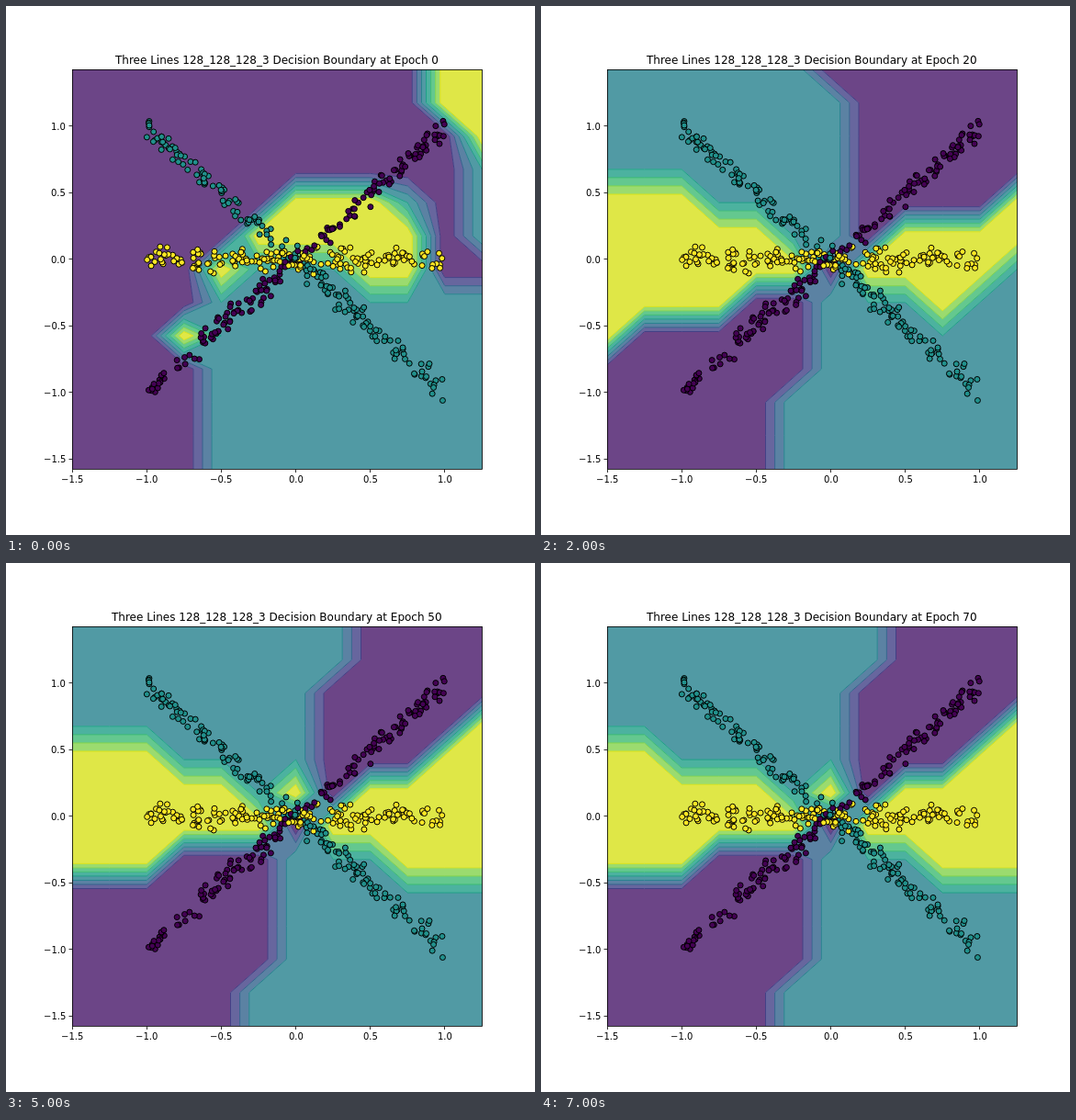
Recreate the animation shown at these times as an HTML page with a canvas. Size 576 by 576 pixels, loop 8000 ms.

```html
<!DOCTYPE html>
<html>
<head>
<meta charset="utf-8">
<style>
html, body { margin: 0; width: 100%; height: 100%; overflow: hidden; background: #fff; }
canvas { display: block; }
</style>
</head>
<body>
<canvas id="stage" width="576" height="576"></canvas>
<script>
const ctx = document.getElementById('stage').getContext('2d');
const LEFT = 72, TOP = 69.12, WIDTH = 446.4, HEIGHT = 434.88;
const COLS = 12, ROWS = 13, STEP_MS = 1000, DOTS_PER_LINE = 180;
const BANDS = ['#481769', '#424086', '#33638d', '#26818e', '#209f88', '#3ebb74', '#82d34c', '#d8e219'];
const PURPLE = 0, TEAL = 1, YELLOW = 2;
const LINES = [
  { slope: 1, color: '#440154' }, { slope: -1, color: '#21918c' }, { slope: 0, color: '#fde725' }
];

const plotX = v => LEFT + (v + 1.5) * WIDTH / 2.75;
const plotY = v => TOP + HEIGHT - (v + 1.5745) * HEIGHT / 3;

// Slopes of the yellow wedges per quadrant (nw, ne, sw, se), the bends of the
// purple borders (lean, foot) and the right limit; each stage changes the last.
const STAGES = [
  { nw: 2.5, ne: 2.5, sw: 2.7, se: 3.2, lean: -0.5, foot: 2.6, limit: 4, tilt: 0, spike: false },
  { nw: 2.27, sw: 2.25, se: 2.2, lean: -0.25, tilt: 1 },
  { nw: 2.1, ne: 2, lean: 0, limit: 9 },
  { nw: 2.27, sw: 2.7 },
  { ne: 1.8, lean: 0.5, foot: 3.6, spike: true },
  { nw: 2, sw: 2.25 },
  { nw: 2.5, sw: 2.7 }
];

// u and v count grid nodes right and up from the centre
function untrained(u, v) {
  const corner = u >= 4 && u + v >= 9;
  const dome = v > 0 && v < 3 && Math.abs(u - 1) <= 3 - v;
  const toe = v === 0 && (u === 2 || u === 3);
  const islands = (u === -2 && v === 0) || (u === -3 && v === -2);
  if (corner || dome || toe || islands) return YELLOW;
  const edge = v > 0 && (u === 5 || (u === 3 && v === 2));
  const floor = u >= -2 && (v < 0 || (v === 0 && u < 4));
  return edge || floor ? TEAL : PURPLE;
}

function trained(u, v, s) {
  const height = v - 0.29, upper = height > 0;
  const slope = upper ? (u < 0 ? s.nw : s.ne) : (u < 0 ? s.sw : s.se);
  const wedge = Math.abs(u) > slope * Math.abs(height) && u - s.tilt * v <= s.limit;
  if (wedge || (s.spike && u === 0 && v === 1)) return YELLOW;
  const purple = upper
    ? u > 0.5 + s.lean * Math.max(0, v - 3.9) && height > 0.2 * u
    : u < Math.max(v + 0.5, -0.5) - 0.4 * Math.max(0, -v - s.foot);
  return purple ? PURPLE : TEAL;
}

function gridAt(step) {
  const stage = Object.assign({}, ...STAGES.slice(0, step));
  const classify = step ? trained : untrained;
  return Array.from({ length: ROWS }, (_, r) =>
    Array.from({ length: COLS }, (_, c) => classify(c - 6, 6 - r, stage)));
}

function addShape(path, points, closed) {
  points.forEach(([c, r], i) => {
    const x = LEFT + c * WIDTH / (COLS - 1), y = TOP + r * HEIGHT / (ROWS - 1);
    i ? path.lineTo(x, y) : path.moveTo(x, y);
  });
  if (closed) path.closePath();
}

// Marching squares: area above the level and its outline
function contour(grid, level) {
  const area = new Path2D(), outline = new Path2D();
  for (let r = 0; r < ROWS - 1; r++) for (let c = 0; c < COLS - 1; c++) {
    const corners = [[c, r], [c + 1, r], [c + 1, r + 1], [c, r + 1]];
    const z = corners.map(([x, y]) => grid[y][x]);
    const shape = [], cuts = [];
    corners.forEach((p, k) => {
      const n = (k + 1) % 4, q = corners[n];
      if (z[k] > level) shape.push(p);
      if (z[k] > level === z[n] > level) return;
      const t = (level - z[k]) / (z[n] - z[k]);
      const cut = [p[0] + t * (q[0] - p[0]), p[1] + t * (q[1] - p[1])];
      shape.push(cut);
      cuts.push(cut);
    });
    const saddle = cuts.length === 4, firstHigh = z[0] > level;
    const joined = z.reduce((a, b) => a + b) / 4 > level;
    if (saddle && firstHigh !== joined) cuts.push(cuts.shift());
    if (saddle && !joined) {
      if (firstHigh) shape.unshift(shape.pop());
      addShape(area, shape.slice(0, 3), true);
      addShape(area, shape.slice(3), true);
    } else addShape(area, shape, true);
    for (let i = 0; i < cuts.length; i += 2) addShape(outline, cuts.slice(i, i + 2));
  }
  return { area, outline };
}

function drawRegions(grid) {
  const layers = BANDS.map((color, i) => ({ color, ...contour(grid, i ? i / 4 : -1) }));
  for (const { color, area } of layers) {
    ctx.fillStyle = '#fff';
    ctx.fill(area);
    ctx.globalAlpha = 0.8;
    ctx.fillStyle = color;
    ctx.fill(area);
    ctx.globalAlpha = 1;
  }
  // Neighbouring translucent bands overlap in a thin darker seam
  ctx.lineWidth = 1;
  for (const { color, outline } of layers) {
    ctx.strokeStyle = color;
    ctx.stroke(outline);
  }
}

let seed = 7;
function random() {
  seed = (seed * 1664525 + 1013904223) % 4294967296;
  return seed / 4294967296;
}

const dots = [];
for (let i = 0; i < DOTS_PER_LINE; i++)
  for (const { slope, color } of LINES) {
    const x = random() * 2 - 1;
    const noise = (random() + random() + random() - 1.5) * 0.09;
    dots.push({ x: plotX(x), y: plotY(slope * x + noise), color });
  }

function drawDots() {
  ctx.strokeStyle = '#000';
  ctx.lineWidth = 1;
  for (const { x, y, color } of dots) {
    ctx.beginPath();
    ctx.arc(x, y, 3, 0, 2 * Math.PI);
    ctx.fillStyle = color;
    ctx.fill();
    ctx.stroke();
  }
}

// Text starts on a whole pixel; anchor 0.5 centres it, 1 aligns it right
function drawText(text, x, y, size, anchor) {
  ctx.font = `${size}px "DejaVu Sans", sans-serif`;
  ctx.fillText(text, Math.round(x - anchor * ctx.measureText(text).width), Math.round(y));
}

function drawAxes(epoch) {
  const bottom = TOP + HEIGHT + 0.5;
  ctx.strokeStyle = ctx.fillStyle = '#000';
  ctx.lineWidth = 0.8;
  ctx.strokeRect(72.5, 69.5, 446, 435);
  ctx.beginPath();
  for (let v = -1.5; v <= 1; v += 0.5) {
    const label = v.toFixed(1).replace('-', '\u2212');
    const x = Math.floor(plotX(v)) + 0.5, y = Math.floor(plotY(v)) + 0.5;
    ctx.moveTo(x, bottom);
    ctx.lineTo(x, bottom + 3.5);
    ctx.moveTo(LEFT, y);
    ctx.lineTo(LEFT - 3.5, y);
    drawText(label, plotX(v), 519, 10, 0.5);
    drawText(label, 65, plotY(v) + 4, 10, 1);
  }
  ctx.stroke();
  drawText(`Three Lines 128_128_128_3 Decision Boundary at Epoch ${epoch}`, LEFT + WIDTH / 2, 63, 12, 0.5);
}

let shown = -1;
function render() {
  const step = Math.floor(performance.now() / STEP_MS) % (STAGES.length + 1);
  if (step !== shown) {
    shown = step;
    ctx.fillStyle = '#fff';
    ctx.fillRect(0, 0, 576, 576);
    drawRegions(gridAt(step));
    drawDots();
    drawAxes(step * 10);
  }
  requestAnimationFrame(render);
}
render();
</script>
</body>
</html>
```
